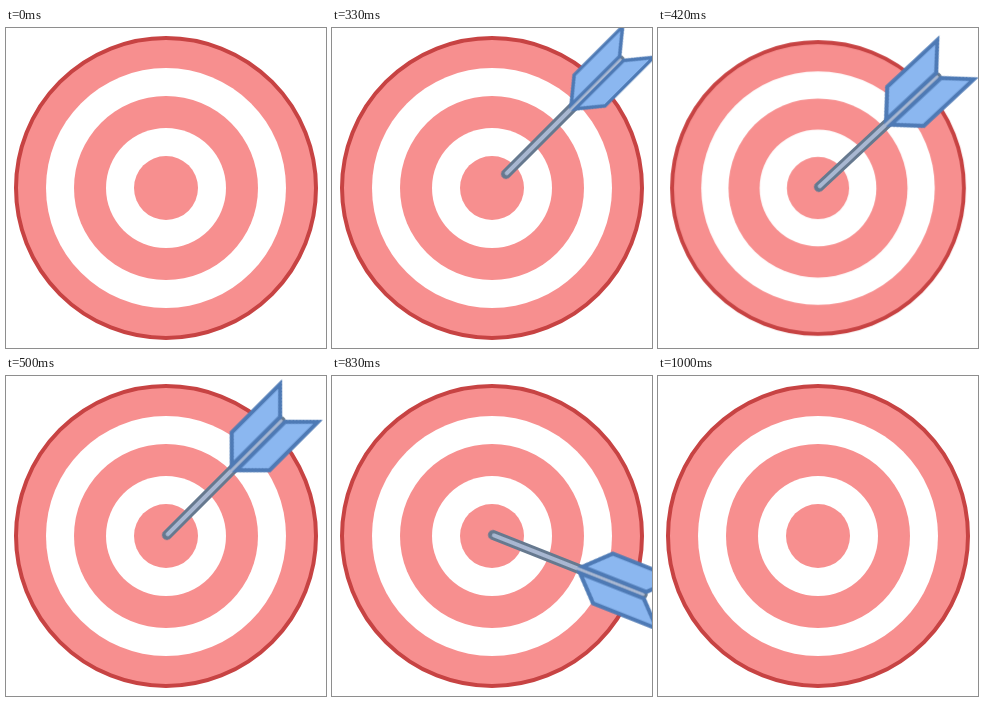
Write an HTML page without scripts that moves like this. It is 320x320 px and loops after 1180 ms.

```html
<!DOCTYPE html>
<html lang="en">
<head>
<meta charset="utf-8">
<title>Arrow and target</title>
<style>
  html, body { margin: 0; width: 100%; height: 100%; overflow: hidden; background: #fff; }
  svg { display: block; width: 100vw; height: 100vh; }

  .pink { fill: #f78f8f; }
  .white { fill: #fff; }
  .rim { stroke: #c74343; stroke-width: 4; }
  .shaft { stroke: #66798f; stroke-width: 10; stroke-linecap: round; }
  .shine { stroke: #a8b7d1; stroke-width: 4; stroke-linecap: round; }
  .fins { fill: #8bb7f0; stroke: #4e7ab5; stroke-width: 4; }

  /* 24 drawings a second, each one held */
  .target, .arrow, .fins { animation: 1.18s step-end infinite; }
  .target { transform-origin: 160px 160px; animation-name: thud; }
  .arrow { animation-name: flight; }
  .fins { animation-name: flare; }

  @keyframes thud {
    0%, 38.2% { transform: none; }
    35.58% { transform: scale(.973); }
    38.97% { transform: scale(.986); }
    42.36%, 100% { transform: none; }
  }

  /* slide in along the shaft, quiver, swing a quarter turn, drop out */
  @keyframes flight {
    0% { transform: rotate(-45deg) translateX(280px); }
    14.39% { transform: rotate(-45deg) translateX(230.5px); }
    17.78% { transform: rotate(-45deg) translateX(184.4px); }
    21.17% { transform: rotate(-45deg) translateX(124.5px); }
    24.56% { transform: rotate(-45deg) translateX(64.5px); }
    27.95% { transform: rotate(-45deg) translateX(18.4px); }
    32.19% { transform: rotate(-45deg) translateX(0); }
    35.58% { transform: rotate(-43deg) translateX(0); }
    38.97% { transform: rotate(-46deg) translateX(0); }
    42.36% { transform: rotate(-45deg) translateX(0); }
    66.93% { transform: rotate(-21.6deg) translateX(0); }
    70.32% { transform: rotate(21.6deg) translateX(0); }
    74.56% { transform: rotate(45deg) translateX(38.9px); }
    77.95% { transform: rotate(45deg) translateX(124.5px); }
    81.34% { transform: rotate(45deg) translateX(210px); }
    84.73%, 100% { transform: rotate(45deg) translateX(280px); }
  }

  @keyframes flare {
    0% { transform: scaleY(.82); }
    32.19% { transform: scaleY(.91); }
    35.58%, 100% { transform: none; }
  }
</style>
</head>
<body>
<svg viewBox="0 0 320 320">
  <g class="target">
    <circle class="pink rim" cx="160" cy="160" r="150"/>
    <circle class="white" cx="160" cy="160" r="120"/>
    <circle class="pink" cx="160" cy="160" r="92"/>
    <circle class="white" cx="160" cy="160" r="60"/>
    <circle class="pink" cx="160" cy="160" r="32"/>
  </g>
  <g transform="translate(161 159)">
    <g class="arrow">
      <path class="shaft" d="M0 0H161"/>
      <path class="shine" d="M1 0H161"/>
      <g class="fins">
        <path id="fin" d="M163.5-3.5L186.7-26.7H118.2L95-3.5Z"/>
        <use href="#fin" transform="scale(1 -1)"/>
      </g>
    </g>
  </g>
</svg>
</body>
</html>
```
